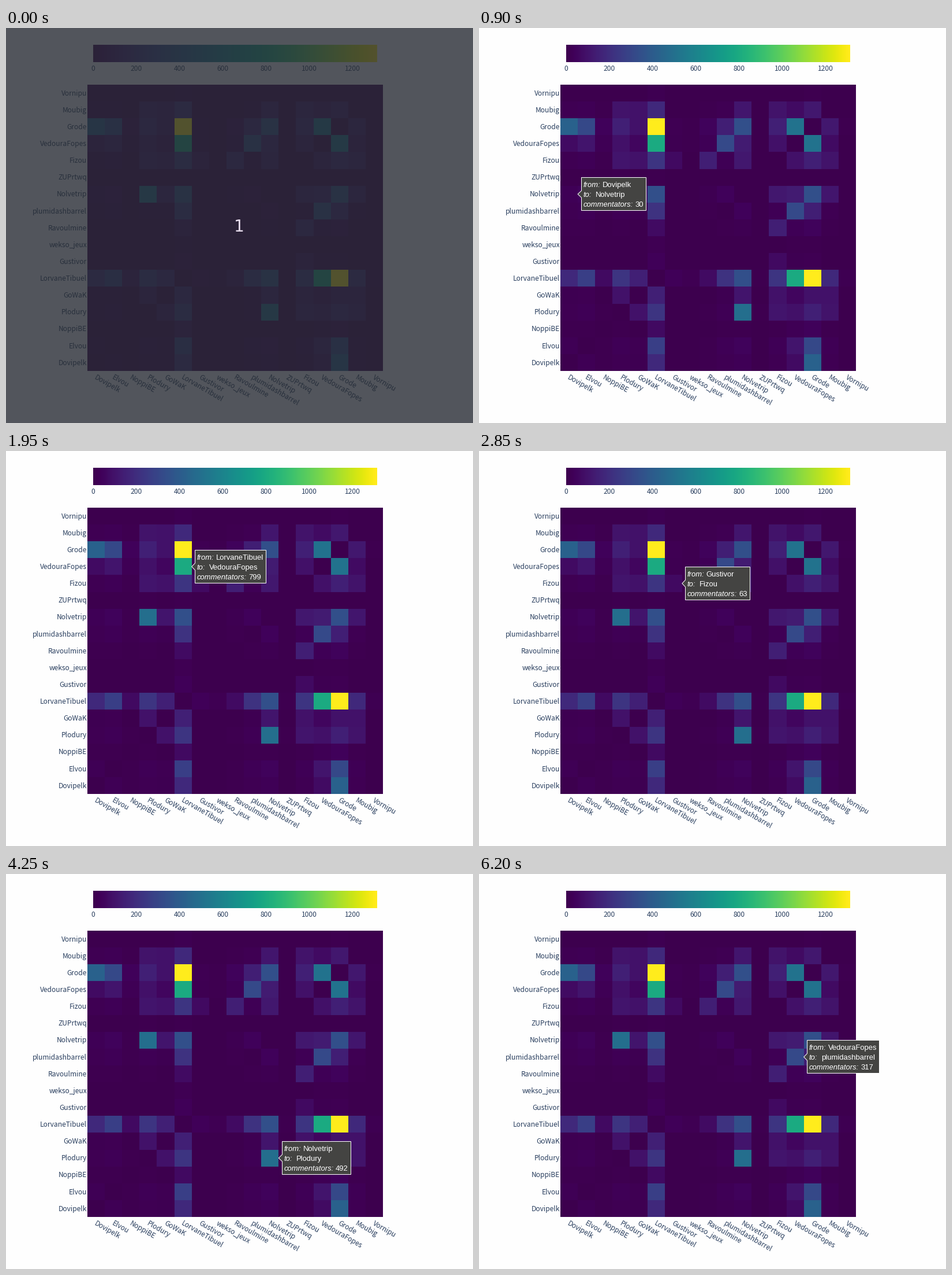
Recreate the animation shown at these times as a matplotlib script. Size 809 px wide and 683 px high, loop 8000 ms.

```python
import math

import matplotlib.pyplot as plt
import numpy as np
from matplotlib.animation import FuncAnimation
from matplotlib.colors import ListedColormap
from matplotlib.patches import Polygon, Rectangle

W, H, DPI = 809, 683, 64
PX = 72 / DPI  # points per pixel
STEP = 50
FRAMES = 8000 // STEP

LEFT, RIGHT, TOP, BOTTOM = 141, 653, 98, 593
BAR_L, BAR_R, BAR_T, BAR_B = 151, 643, 29, 59
VMAX = 1315
INK = "#2a3f5f"
LABEL_FONT = ["Noto Sans CJK JP", "DejaVu Sans"]

# channels from left to right and bottom to top, with their popularity
CHANNELS = {
    "Dovipelk": 4, "Elvou": 6, "NoppiBE": 1.4, "Plodury": 5, "GoWaK": 3.2,
    "LorvaneTibuel": 45.4, "Gustivor": 0.7, "wekso_jeux": 0.35,
    "Ravoulmine": 1.5, "plumidashbarrel": 4.8, "Nolvetrip": 7.5,
    "ZUPrtwq": 0.15, "Fizou": 5, "VedouraFopes": 17.6, "Grode": 29,
    "Moubig": 4, "Vornipu": 0.25,
}
NAMES = list(CHANNELS)
N = len(NAMES)

# a circle of friends shares extra commentators; a few pairs stand out
CIRCLE = [3, 4, 10, 12, 15]
BONDS = {(0, 14): 430, (1, 14): 310, (10, 14): 340, (3, 10): 492,
         (9, 13): 317, (8, 12): 140, (6, 12): 63, (3, 11): 6}

# mouse path: time in ms, column and row in cells from the top left
PATH = np.array([
    (900, 0.5, 6.4), (1000, 2.02, 5.9), (1250, 3.02, 5.5),
    (1550, 4.02, 4.98), (1650, 4.3, 3.97), (1950, 5.02, 3.5),
    (2850, 6.02, 4.02), (3050, 8.05, 6.05), (3250, 9.02, 7.02),
    (3400, 9.3, 8.05), (3450, 8.9, 10.02), (3600, 8.9, 11.02),
    (3750, 9.02, 11.5), (4050, 10.02, 12.02), (4250, 10.3, 13.02),
    (5750, 10.4, 13.4), (5800, 10.4, 12.5), (6200, 13.05, 7.95),
])


def build_matrix():
    fame = np.array(list(CHANNELS.values()))
    z = np.outer(fame, fame)
    z[np.ix_(CIRCLE, CIRCLE)] += 80
    for (i, j), value in BONDS.items():
        z[i, j] = z[j, i] = value
    np.fill_diagonal(z, 0)
    return np.round(z)


def contrast_viridis():
    rgb = plt.get_cmap("viridis")(np.arange(256))[:, :3]
    return ListedColormap(np.clip(1.07 * rgb - 0.043, 0, 1))


def col_x(c):
    return LEFT + c * (RIGHT - LEFT) / N


def row_y(r):
    return TOP + r * (BOTTOM - TOP) / N


def half(v):
    return math.floor(v) + 0.5


def cell_index(start, end):
    """Cell number under each pixel centre from start to end."""
    size = end - start
    return ((np.arange(size) + 0.5) * N / size).astype(int)


Z = build_matrix()
CMAP = contrast_viridis()
fig = plt.figure(figsize=(W / DPI, H / DPI), dpi=DPI, facecolor="#fefefe")
ax = fig.add_axes([0, 0, 1, 1])
ax.axis("off")


def label(x, y, s, size=12, color=INK, family=LABEL_FONT, **kw):
    return ax.text(x, y, s, fontsize=size * PX, color=color, family=family,
                   va="baseline", **kw)


def pixels(values, left, right, top, bottom):
    ax.imshow(values, cmap=CMAP, vmin=0, vmax=VMAX, aspect="auto",
              interpolation="nearest", extent=(left, right, bottom, top))


# heatmap
rows, cols = cell_index(TOP, BOTTOM), cell_index(LEFT, RIGHT)
pixels(Z[::-1][np.ix_(rows, cols)], LEFT, RIGHT, TOP, BOTTOM)
for k, name in enumerate(NAMES):
    label(140, row_y(N - k - 0.5) + 4.2, name, ha="right")
    label(col_x(k + 0.5) - 3.5, 606.5, name, ha="left", rotation=-30,
          rotation_mode="anchor")

# colour bar
ramp = np.linspace(0, VMAX, BAR_R - BAR_L)
pixels(np.tile(ramp, (BAR_B - BAR_T, 1)), BAR_L, BAR_R, BAR_T, BAR_B)
for tick in range(0, 1201, 200):
    label(BAR_L + tick * (BAR_R - BAR_L) / VMAX, 74, str(tick), ha="center")

ax.set_xlim(0, W)
ax.set_ylim(H, 0)

# tooltip
box = ax.add_patch(Polygon([(0, 0), (1, 0), (1, 1)], facecolor="#444442",
                           edgecolor="white", linewidth=PX, zorder=5))
INDENT = {"from:": 33.2, "to:": 21.7, "commentators:": 89.6}
tip_font = dict(size=13, color="white", family="Liberation Sans", zorder=6)
keys = [label(0, 0, key, style="italic", **tip_font) for key in INDENT]
values = [label(0, 0, "", **tip_font) for _ in INDENT]
tooltip = [box, *keys, *values]

# countdown screen
countdown = [
    ax.add_patch(Rectangle((0, 0), W, H, color=(39 / 255, 43 / 255, 51 / 255),
                           alpha=0.8, linewidth=0, zorder=10)),
    label(404, 352.5, "1", size=28, color="#e6dcec", family="DejaVu Sans",
          ha="center", zorder=11),
]


def place_tooltip(c, r):
    tip, cy = col_x(c + 1), row_y(r + 0.5)
    x = half(tip + 6)
    top, bottom = half(cy - 28.5), half(cy + 28.5)
    row = N - 1 - r
    texts = [NAMES[c], NAMES[row], f"{Z[row, c]:.0f}"]
    width = 0
    for i, (s, indent) in enumerate(zip(texts, INDENT.values())):
        y = cy + 4.8 + (i - 1) * 16.9
        keys[i].set_position((x + 3, y))
        values[i].set_position((x + 3 + indent, y))
        values[i].set_text(s)
        width = max(width, indent + values[i].get_window_extent().width)
    right = half(x + width + 7.5)
    box.set_xy([(tip, cy), (x, cy - 6), (x, top), (right, top),
                (right, bottom), (x, bottom), (x, cy + 6)])


def draw(frame):
    now = frame * STEP
    times, path_x, path_y = PATH.T
    hovering = now >= times[0]
    for artist in countdown:
        artist.set_visible(frame == 0)
    for artist in tooltip:
        artist.set_visible(hovering)
    if hovering:
        place_tooltip(int(np.interp(now, times, path_x)),
                      int(np.interp(now, times, path_y)))
    return tooltip + countdown


anim = FuncAnimation(fig, draw, frames=FRAMES, interval=STEP, repeat=True,
                     repeat_delay=0, init_func=lambda: draw(0))
plt.show()
```
